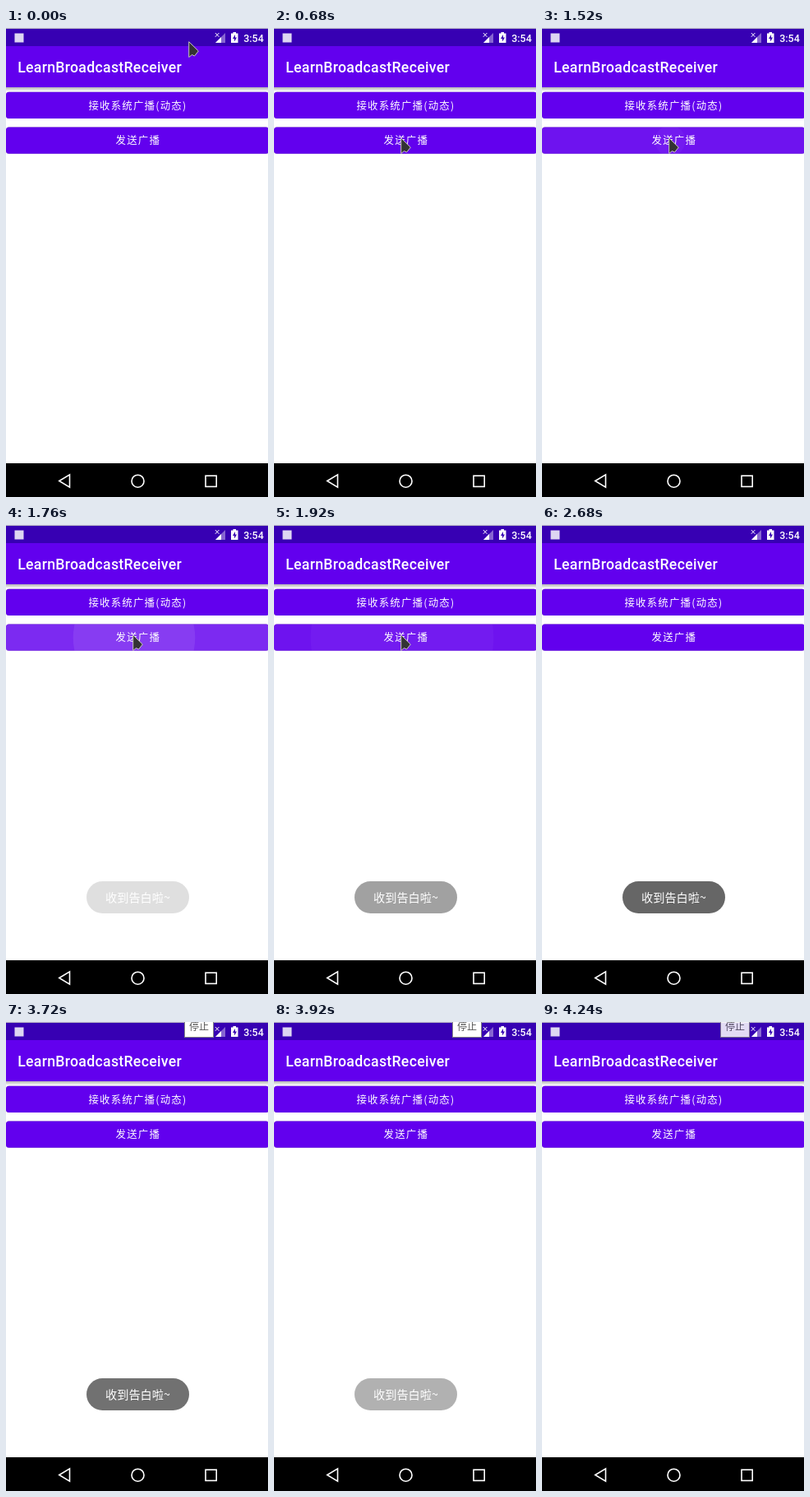
Recreate the animation shown at these times as an HTML page. Size 319x570 px, loop 4320 ms.

```html
<!DOCTYPE html>
<html lang="zh-CN">
<head>
<meta charset="utf-8">
<title>LearnBroadcastReceiver</title>
<style>
  html, body { margin: 0; width: 100%; height: 100%; overflow: hidden; background: #fff; }
  svg { display: block; width: 319px; height: 570px; }
  text { font-family: "Noto Sans CJK SC", "Noto Sans CJK", sans-serif; fill: #fff; }
  .latin { font-family: Roboto, sans-serif; font-weight: 500; }
  .label { font-size: 12.4px; letter-spacing: 1.25px; }
  .button { fill: #6200ee; filter: drop-shadow(0 .5px .7px #0005); }
  .nav { fill: none; stroke: #fff; stroke-width: 1.6; }
</style>
</head>
<body>
<svg viewBox="0 0 319 570">
  <defs>
    <linearGradient id="shade" x2="0" y2="1">
      <stop stop-color="#000" stop-opacity=".3"/>
      <stop offset="1" stop-color="#000" stop-opacity="0"/>
    </linearGradient>
    <clipPath id="press"><rect y="120.5" width="320" height="32.2" rx="3.5"/></clipPath>
  </defs>
  <rect width="319" height="570" fill="#fff"/>

  <!-- app bar and status bar -->
  <rect y="72" width="319" height="5" fill="url(#shade)"/>
  <rect width="319" height="72" fill="#6200ee"/>
  <rect width="319" height="22" fill="#3700b3"/>
  <rect width="319" height="1" fill="#b9b4c4"/>
  <rect x="10.5" y="6.5" width="11" height="11" fill="#ddd6f2"/>
  <path d="M255 18H267V6Z" fill="#fff" opacity=".4"/>
  <path d="M255 18H262V11Z" fill="#fff"/>
  <path d="M254.8 6l4.6 4.8m0-4.8l-4.6 4.8" stroke="#fff"/>
  <path d="M274 6.5h2.5V5h3.5v1.5h2.5V18H274Z" fill="#fff"/>
  <path d="M279 8l-3 5h2v3.5l3-5h-2Z" fill="#3700b3"/>
  <text class="latin" x="289.3" y="16.5" font-size="12.4">3:54</text>
  <text class="latin" x="14.2" y="54" font-size="17.7" letter-spacing=".29">LearnBroadcastReceiver</text>

  <!-- buttons -->
  <rect class="button" y="77.8" width="320" height="32.2" rx="3.5"/>
  <text class="label" x="100.4" y="98.7">接收系统广播(动态)</text>
  <rect class="button" y="120.5" width="320" height="32.2" rx="3.5"/>
  <g clip-path="url(#press)" fill="#fff">
    <rect id="tint" y="120" width="320" height="33"/>
    <circle id="ripple" cx="156" cy="137"/>
  </g>
  <text class="label" x="133.6" y="141.4">发送广播</text>

  <g id="toast">
    <rect x="98" y="433" width="125" height="39" rx="19.5" fill="#666"/>
    <text x="121" y="458" font-size="14.2">收到告白啦~</text>
  </g>

  <!-- navigation bar -->
  <rect y="529" width="319" height="41" fill="#000"/>
  <path class="nav" d="M64.8 550.5L77.5 542.8V558.2Z"/>
  <circle class="nav" cx="160.5" cy="550.7" r="7.5"/>
  <rect class="nav" x="243" y="544.2" width="13.2" height="13.2"/>

  <g id="tip">
    <rect x="217.5" y="-4.5" width="35" height="23" fill="#fff" stroke="#858585"/>
    <text x="223" y="10" font-size="12" style="fill:#575757">停止</text>
  </g>
  <path id="cursor" d="M.7 .7L12.3 12L7.5 18L4.5 16.5L.7 19.5Z" fill="#333" stroke="#c8c4c0"/>
  <circle id="click" cx="154" cy="134" r="12" fill="#ff0" opacity=".47"/>
</svg>
<script>
const LOOP = 4320;
const $ = id => document.getElementById(id);

// Progress from 0 to 1 in n even jumps, the first at start and the last at end.
const stair = (t, start, end, n) =>
  Math.max(0, Math.min(n, 1 + Math.floor((t - start) * (n - 1) / (end - start)))) / n;
const smooth = p => p * p * (3 - 2 * p);

const moves = [
  { start: 80, end: 120, n: 2, x: 202, y: 102 },
  { start: 280, end: 440, n: 3, x: 154, y: 120 },
  { start: 600, end: 680, n: 2, x: 154, y: 133 },
  { start: 2320, end: 2680, n: 6, x: 218, y: -40 }
];

function pointer(t) {
  let x = 222, y = 16;
  for (const m of moves) {
    const p = smooth(stair(t, m.start, m.end, m.n));
    x += (m.x - x) * p;
    y += (m.y - y) * p;
  }
  return `translate(${x} ${y})`;
}

function draw(t) {
  $("cursor").setAttribute("transform", pointer(t));
  $("click").style.display = t >= 1080 && t < 1120 ? "" : "none";

  const press = stair(t, 1520, 2000, 7);
  const glow = Math.max(0, .17 * Math.sin(Math.PI * press));
  $("tint").setAttribute("opacity", glow);
  $("ripple").setAttribute("opacity", glow / 2);
  $("ripple").setAttribute("r", 130 * press);

  const toast = smooth(stair(t, 1680, 2160, 7)) - smooth(stair(t, 3720, 4080, 6));
  $("toast").setAttribute("opacity", toast);

  const tip = stair(t, 3080, 3240, 3) - stair(t, 4240, 4720, 7);
  $("tip").setAttribute("opacity", tip);
}

const start = performance.now();
function tick() {
  draw((performance.now() - start) % LOOP);
  requestAnimationFrame(tick);
}
tick();
</script>
</body>
</html>
```
